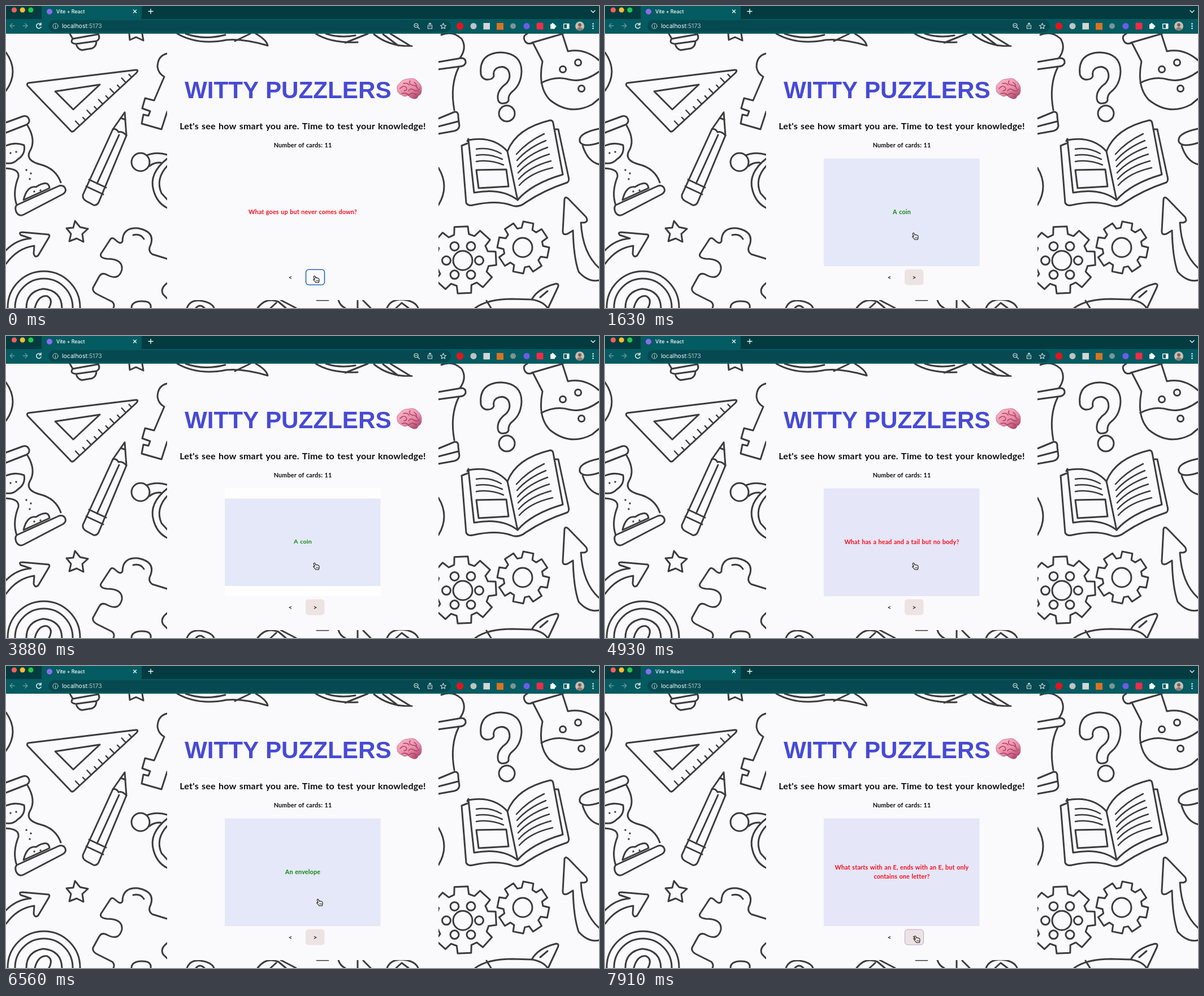
Recreate the animation shown at these times as an HTML page with a canvas. Size 1049 by 534 pixels, loop 8000 ms.

```html
<!DOCTYPE html>
<html lang="en">
<head>
<meta charset="utf-8">
<title>Riddle cards</title>
<style>
  html, body { margin: 0; width: 100%; height: 100%; overflow: hidden; background: #fafafd; }
  canvas { display: block; }
</style>
</head>
<body>
<canvas id="stage" width="1049" height="534"></canvas>
<script>
const W = 1049, H = 534, LOOP = 8000;
const PAPER = '#fafafd', INK = '#3c3c3c';
const PAGE_FONT = 'Lato, "Open Sans", sans-serif';
const UI_FONT = 'Inter, Roboto, sans-serif';
const view = document.getElementById('stage').getContext('2d');
const backdrop = document.createElement('canvas');
backdrop.width = W;
backdrop.height = H;
let c = backdrop.getContext('2d');

function stroke(path, color = INK, width = 3) {
  c.strokeStyle = color;
  c.lineWidth = width;
  c.lineCap = c.lineJoin = 'round';
  c.stroke(new Path2D(path));
}
function fill(path, color) {
  c.fillStyle = color;
  c.fill(new Path2D(path));
}
function rect(x, y, w, h, color, r = 0) {
  c.fillStyle = color;
  c.beginPath();
  c.roundRect(x, y, w, h, r);
  c.fill();
}
function disc(x, y, r, color) {
  c.fillStyle = color;
  c.beginPath();
  c.arc(x, y, r, 0, 7);
  c.fill();
}
function ring(x, y, r, color = INK, width = 3) {
  c.strokeStyle = color;
  c.lineWidth = width;
  c.beginPath();
  c.arc(x, y, r, 0, 7);
  c.stroke();
}
function text(str, x, y, font, color, align = 'left') {
  c.font = font;
  c.fillStyle = color;
  c.textAlign = align;
  c.fillText(str, x, y);
}
function pageText(str, y, size, color) {
  c.letterSpacing = size * 0.014 + 'px';
  c.wordSpacing = size * 0.06 + 'px';
  text(str, 525, y, `700 ${size}px ${PAGE_FONT}`, color, 'center');
  c.letterSpacing = c.wordSpacing = '0px';
}

function gear(x, y, outer, root, phase) {
  const teeth = 8, step = Math.PI * 2 / teeth;
  c.beginPath();
  for (let i = 0; i < teeth; i++) {
    const a = phase + i * step;
    for (const [da, r] of [[-0.28, root], [-0.2, outer], [0.2, outer], [0.28, root]]) {
      c.lineTo(x + r * Math.cos(a + da), y + r * Math.sin(a + da));
    }
  }
  c.closePath();
  c.strokeStyle = INK;
  c.lineWidth = 3;
  c.stroke();
}

function leftDoodles() {
  // bulb base, star, ball edge
  stroke('M113 49L118 58Q112 66 124 67L160 62Q168 58 163 49M118 58L163 50M124 67Q126 76 134 78L152 75Q160 72 160 62');
  stroke('M218 49L219 60L230 55L243 61L241 49');
  stroke('M0 82Q24 116 0 150');
  // set square
  stroke('M40 136L230 113Q235 113 231 118L120 221Q116 224 113 219L38 141Q36 137 40 136Z');
  stroke('M87 151L166 139L119 183Z');
  for (let i = 1; i < 11; i++) {
    const x = 232 - i * 10.2, y = 116 + i * 9.5, n = i % 2 ? 6 : 10;
    stroke(`M${x} ${y}l${-n * 0.7} ${-n * 0.75}`, INK, 2.5);
  }
  // key
  stroke('M285 84Q268 88 268 108Q270 120 280 125L262 167L246 163L241 181L255 186L252 194L243 192L240 208L275 218L285 187');
  // pencil
  stroke('M210 188L189 218L136 334Q135 341 142 345L155 352Q161 353 164 347L213 229Z');
  stroke('M189 218Q195 216 199 223Q206 221 213 229M203 198L211 201M200 228L161 314M147 307L177 321M142 319L172 333');
  // hourglass
  stroke('M0 206L30 195Q38 193 41 201Q42 207 36 210L0 224');
  stroke('M38 211Q54 238 42 257Q34 273 60 280Q88 287 97 312M0 287Q24 288 22 302Q11 330 19 352');
  stroke('M19 352L94 318Q102 316 105 323Q107 329 100 333L31 369Q23 373 18 364Q15 356 19 352Z');
  stroke('M0 247Q16 240 32 246Q35 262 21 271Q13 280 0 278M31 343Q37 318 53 320Q75 306 77 322Z');
  for (const [x, y] of [[8, 260], [18, 258], [36, 290], [44, 296], [42, 306], [50, 328], [61, 326]]) disc(x, y, 1.7, INK);
  // stand with knob
  ring(238, 276, 16);
  stroke('M249 264Q266 257 285 263M254 283Q262 276 274 277M285 270Q252 296 261 326Q267 348 285 357M285 283Q264 306 275 331L285 342');
  // curved arrow, star
  stroke('M0 432Q18 413 44 411L26 405Q22 400 29 400L75 404Q78 405 76 409L57 441Q51 446 49 438L50 424Q20 428 0 456');
  stroke('M122 380L131 391L145 394L135 403L137 417L125 411L112 416L115 403L107 393L119 392Z');
  // coiled clip
  for (const r of [64, 51]) ring(67, 533, r);
  stroke('M36 534Q36 505 66 500Q98 503 99 534M51 534Q57 511 73 513Q84 519 76 534');
  // jigsaw piece
  stroke('M285 447L259 439Q250 433 256 422Q264 399 234 393Q206 391 206 416Q203 423 193 413Q187 407 183 415L168 438Q165 445 178 447Q207 447 205 466Q200 486 180 476Q170 470 165 478L154 498Q152 505 162 510L188 523Q193 528 190 534');
  stroke('M222 534Q222 523 238 522Q258 521 256 534M285 490Q272 500 278 510L285 517M225 405Q238 402 244 412');
}

function rightDoodles() {
  // chess pawn
  stroke('M770 51Q790 43 806 58Q816 74 803 92M765 99L806 92Q814 93 813 101Q810 107 802 107L765 112');
  stroke('M801 108Q785 140 793 184M765 199L794 187Q801 187 800 196L802 212Q801 219 793 221L765 226M765 213L800 204');
  // question mark
  stroke('M840 121Q836 83 876 82Q912 84 912 116Q911 139 896 151Q888 157 889 167Q887 173 876 172Q869 170 870 159Q871 147 885 137Q895 126 888 113Q880 104 868 110Q861 115 863 124Q860 131 849 130Q842 128 840 121Z');
  ring(886, 190, 14);
  // flask
  stroke('M922 49Q913 53 918 62Q922 69 932 65L949 98Q940 143 962 166Q998 195 1037 174L1049 164M984 49L994 80Q1024 74 1049 96M930 65L985 49');
  stroke('M947 136Q972 123 996 130Q1022 136 1049 116');
  for (const [x, y] of [[1012, 100], [985, 112], [1018, 146]]) ring(x, y, 5.5);
  // open book
  stroke('M818 237Q862 229 887 257Q903 216 963 202Q967 202 968 207L985 298Q930 314 905 343Q877 321 828 330Z');
  stroke('M818 235L816 239M816 243L806 247L814 348Q817 354 826 352Q867 343 893 352Q906 358 920 347Q951 326 993 312Q997 309 995 302L977 218L970 218M887 257L905 343');
  stroke('M832 290L885 289L889 319L836 322Z');
  for (let i = 0; i < 3; i++) stroke(`M832 ${253 + i * 11}Q855 ${249 + i * 11} ${876 + i * 2} ${261 + i * 10}`, INK, 2.5);
  for (let i = 0; i < 6; i++) stroke(`M${903 + i} ${262 + i * 11}Q${922 + i} ${240 + i * 11} ${952 + i * 3} ${226 + i * 12}`, INK, 2.5);
  // edge pieces
  stroke('M1049 217Q1011 225 1015 240Q1021 251 1049 242M1020 247Q1029 275 1049 280');
  stroke('M765 286Q785 319 765 352');
  // upward arrow
  stroke('M1049 485Q1030 489 1013 470Q1004 444 1003 397L993 403Q984 406 985 397L988 341Q990 336 995 341L1026 373Q1031 381 1023 383L1017 383Q1020 437 1049 463');
  gear(808, 449, 60, 47, -0.05);
  ring(808, 450, 17);
  for (let i = 0; i < 6; i++) ring(808 + 29 * Math.cos(i * 1.047), 450 + 29 * Math.sin(i * 1.047), 7.5);
  gear(915, 427, 46, 35, 0.2);
  ring(914, 427, 17);
  // rocket
  stroke('M830 534Q852 518 896 518L930 519Q941 499 973 491Q980 491 975 500L959 534M850 521L858 534M930 519Q950 522 958 534M945 515L958 504');
}

function middleDoodles() {
  stroke('M303 49Q340 70 390 60Q420 57 463 70Q461 60 442 49M318 49Q350 61 388 51M405 62L432 49');
  stroke('M548 49Q575 66 622 64M566 49Q590 57 618 52M600 65L640 49M651 50Q678 72 718 71M667 50L694 70M680 49L716 71');
  stroke('M320 534Q326 519 344 521Q364 524 368 534M336 534Q343 526 351 534M445 534Q460 514 482 523L495 534M468 534L478 525M486 520L513 534');
  stroke('M550 520H570M588 520Q591 530 600 534M622 534V521M632 521L645 534M674 534Q680 519 700 519Q724 521 729 534M690 534L700 525L712 534');
}

function browser() {
  rect(0, 0, W, 25, '#033b40');
  rect(0, 23, W, 26, '#045b61');
  rect(63, -6, 177, 32, '#045b61', 6);
  ['#fe5f57', '#febc2e', '#28c840'].forEach((color, i) => disc(14.5 + i * 14.7, 7, 4.6, color));
  disc(77, 10, 5, '#8a6cf0');
  text('Vite + React', 89, 13, '500 8.7px ' + UI_FONT, '#fff');
  const white = '#f4ffff', dim = '#69989b';
  stroke('M225.5 7L230.5 12M230.5 7L225.5 12M256 5.5V13.5M252 9.5H260', white, 1.3);
  stroke('M1035 8L1038.500 11.500L1042 8', white, 1.3);
  stroke('M15 35H7M11 31L7 35L11 39', dim, 1.3);
  stroke('M30 35H38M34 31L38 35L34 39', dim, 1.3);
  stroke('M61.500 32.500A4.300 4.300 0 1 0 62 37M62 30V33.500H58.500', white, 1.4);
  rect(75, 25, 712, 21, '#064950', 10.5);
  ring(87.5, 35.5, 4.6, '#c3d9db', 1);
  stroke('M87.500 35V38M87.500 33V33.100', '#c3d9db', 1.1);
  text('localhost', 99, 39, '10.5px ' + UI_FONT, white);
  text(':5173', 99 + c.measureText('localhost').width, 39, '10.5px ' + UI_FONT, '#a9c6c8');
  const icon = '#cfe0e1';
  ring(725.5, 34.5, 3.5, icon, 1.2);
  stroke('M728 37L731.500 40.500M724 34.500H727', icon, 1.2);
  stroke('M748 34H746.500V40H753.500V34H752M750 37V30M748 32L750 30L752 32', icon, 1.1);
  stroke('M773.500 30.500L775 34L778.500 34.300L775.800 36.600L776.700 40L773.500 38.200L770.300 40L771.200 36.600L768.500 34.300L772 34Z', icon, 1.1);
  // extension marks
  disc(803, 35.5, 6.3, '#e5141c');
  disc(827, 35.5, 5.5, '#bfc3c3');
  rect(844.5, 30, 11.5, 11.5, '#d3d7d6');
  rect(868, 30, 12, 12, '#d87322');
  disc(897, 35.5, 5, '#7c9494');
  disc(921, 35.5, 5.5, '#6d5be8');
  rect(938.5, 29.5, 12, 12, '#ee2c48', 2);
  rect(963, 32, 8, 8.5, white, 1);
  disc(967, 31.8, 1.9, white);
  disc(971.5, 36, 1.9, white);
  rect(986, 31, 10.5, 9.5, white, 1);
  rect(987.3, 32.3, 4.8, 6.9, '#045b61');
  // profile silhouette
  disc(1015, 35.5, 8, '#c9beb4');
  disc(1015, 33.5, 2.9, '#795f55');
  fill('M1009.500 41Q1015 33.500 1020.500 41Q1015 46 1009.500 41Z', '#907a72');
  for (const y of [31.5, 35.5, 39.5]) disc(1038.5, y, 1.2, white);
}

function brain() {
  const shape = 'M693 151Q689 141 697 136Q702 129 712 129Q722 126 728 133Q736 139 735 149Q735 157 729 159Q728 165 721 164Q714 162 711 158Q704 162 700 157Q695 156 693 151Z';
  const g = c.createLinearGradient(702, 130, 724, 166);
  g.addColorStop(0, '#fbb3c6');
  g.addColorStop(0.55, '#e78ba6');
  g.addColorStop(1, '#a63e62');
  fill(shape, g);
  stroke(shape, '#c96585', 0.8);
  stroke('M697 146Q703 139 708 144Q711 149 704 150M703 137Q710 135 713 140M715 132Q711 138 719 140Q726 140 728 146M712 150Q716 144 722 149Q728 152 731 147M700 155Q708 152 712 158Q718 151 726 157M722 135Q727 138 726 142', '#a93f66', 1.4);
}

function paintBackdrop() {
  rect(0, 0, W, H, PAPER);
  c.filter = 'blur(0.5px)';
  leftDoodles();
  rightDoodles();
  middleDoodles();
  c.filter = 'none';
  rect(285, 72, 480, 448, PAPER);
  browser();
  text('WITTY PUZZLERS', 316, 163, '700 42.2px "Liberation Sans", Arial, sans-serif', '#464ad6');
  brain();
  pageText("Let's see how smart you are. Time to test your knowledge!", 218, 16.05, '#0c0c0c');
  pageText('Number of cards: 11', 250, 10.8, '#0c0c0c');
  text('<', 503, 483.5, '600 12px ' + PAGE_FONT, '#111', 'center');
}

const cards = {
  up: ['What goes up but never comes down?'],
  tail: ['What has a head and a tail but no body?'],
  coin: ['A coin'],
  letter: ['What starts with an E, ends with an E, but only', 'contains one letter?'],
  envelope: ['An envelope']
};
const answers = ['coin', 'envelope'];

// Each step changes only what it names; squash is the card's height, lean the text's.
const steps = [
  [0, { card: 'up', shown: false, button: 'focus', x: 549, y: 483, squash: 1, lean: 1 }],
  [300, { card: 'tail' }],
  [890, { y: 440 }],
  [1040, { y: 407 }],
  [1330, { shown: true, button: 'idle' }],
  [1480, { card: 'coin', squash: 0.81 }],
  [1630, { squash: 1 }],
  [2680, { card: 'tail', lean: 0.85 }],
  [2830, { lean: 0.97 }],
  [2980, { lean: 1 }],
  [3880, { card: 'coin', squash: 0.81 }],
  [4030, { squash: 1 }],
  [4630, { card: 'tail', lean: 0.85 }],
  [4780, { lean: 0.97 }],
  [4930, { lean: 1 }],
  [5080, { y: 425 }],
  [5230, { y: 458 }],
  [5380, { y: 483, button: 'hover' }],
  [5670, { button: 'focus' }],
  [5820, { card: 'letter' }],
  [5970, { x: 551, y: 456 }],
  [6110, { x: 555, y: 418 }],
  [6260, { button: 'idle' }],
  [6410, { card: 'envelope', squash: 0.81 }],
  [6560, { squash: 1 }],
  [7310, { card: 'letter', squash: 0.81 }],
  [7460, { squash: 1 }],
  [7610, { x: 554, y: 438 }],
  [7760, { x: 552, y: 466 }],
  [7910, { y: 483, button: 'hover' }]
];

function stateAt(t) {
  return Object.assign({}, ...steps.filter(([at]) => at <= t).map(([, change]) => change));
}

function drawCard(s) {
  const isAnswer = answers.includes(s.card), lines = cards[s.card];
  if (s.squash < 1) rect(387, 269, 276, 191, '#fefefe');
  c.save();
  c.translate(0, 364.75);
  c.scale(1, s.squash);
  if (s.shown) rect(387, -95.25, 275.5, 190.5, isAnswer ? '#e4e8f8' : '#e5e6f7');
  c.scale(1, s.lean);
  lines.forEach((line, i) => {
    const y = 3.3 + (i - (lines.length - 1) / 2) * 16;
    pageText(line, y, 10.8, isAnswer ? '#118511' : '#fb0d1b');
  });
  c.restore();
}

function drawButton(mode) {
  rect(530, 465.5, 33.5, 28, mode === 'focus' ? PAPER : '#eee3e3', 5);
  if (mode !== 'idle') {
    c.beginPath();
    c.roundRect(530.5, 466, 33, 27, 5);
    c.strokeStyle = mode === 'focus' ? '#2269c3' : '#b9a9dc';
    c.lineWidth = mode === 'focus' ? 1.6 : 1;
    c.stroke();
  }
  text('>', 547, 483.5, '600 12px ' + PAGE_FONT, '#111', 'center');
}

function drawCursor(x, y) {
  const hand = 'M-4.800 -4.500Q-3.600 -6.600 -2.200 -5L-.8 -1.800Q0 -3 1.100 -2Q2.200 -2.700 2.900 -1.500Q4.600 -1.800 5 .3L5 3Q4.300 4.500 4.200 6H-1.200Q-2.400 3.600 -5 1.600Q-5.800 0 -4 .1L-2.800 .8Z';
  c.save();
  c.translate(x, y);
  fill(hand, '#fff');
  stroke(hand, '#111', 1.1);
  stroke('M-.3 1.500V4M1.400 1.500V4M3 1.500V4', '#222', 0.7);
  c.restore();
}

paintBackdrop();
c = view;

function frame(now) {
  const s = stateAt(now % LOOP);
  c.drawImage(backdrop, 0, 0);
  drawCard(s);
  drawButton(s.button);
  drawCursor(s.x, s.y);
  requestAnimationFrame(frame);
}
frame(performance.now());
</script>
</body>
</html>
```
